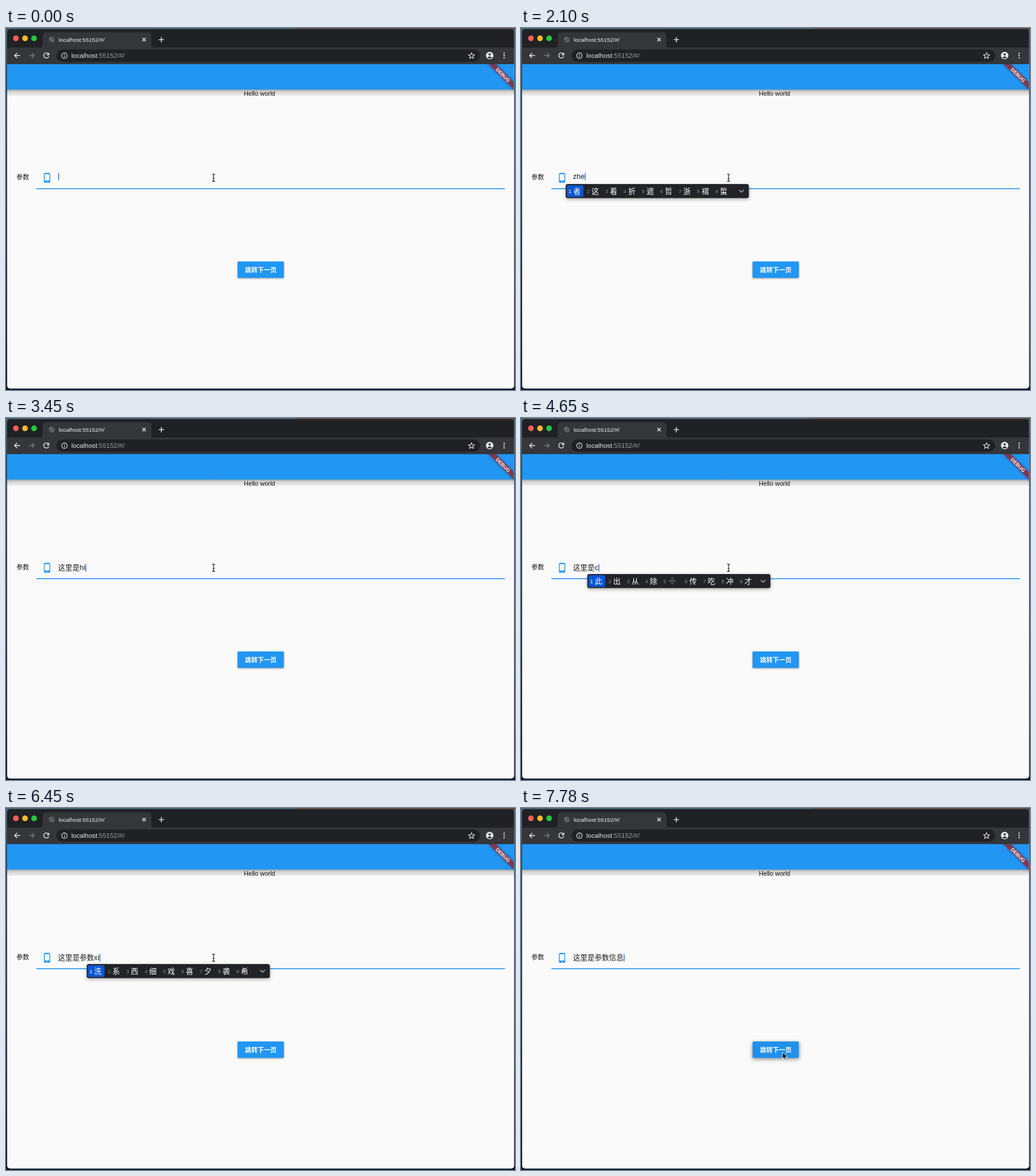
These frames come from a looping animation (888 by 631 pixels, 8000 ms). An HTML page:

```html
<!DOCTYPE html>
<html lang="zh-CN">
<head>
<meta charset="utf-8">
<title>Form demo</title>
<style>
html, body { margin: 0; width: 100%; height: 100%; overflow: hidden; background: #14263a; }
svg { display: block; width: 888px; height: 631px; }
text { font-family: "Liberation Sans", Arial, "Noto Sans CJK SC", "Noto Sans CJK", "Noto Sans CJK JP", sans-serif; white-space: pre; }
.line { fill: none; stroke: #e8eaed; stroke-width: 1.4; }
.button { filter: drop-shadow(0 1.5px 1.6px rgba(0,0,0,.42)); }
.button.hover { filter: drop-shadow(0 2.5px 3.5px rgba(0,0,0,.48)); }
.button.hover rect { fill: #2090ea; }
.panel { filter: drop-shadow(0 2px 3px rgba(0,0,0,.32)); }
</style>
</head>
<body>
<svg viewBox="0 0 888 631" xmlns="http://www.w3.org/2000/svg">
  <defs>
    <linearGradient id="desk" x2="0" y2="1">
      <stop stop-color="#3a6580"/><stop offset=".1" stop-color="#29506d"/>
      <stop offset=".5" stop-color="#233c58"/><stop offset="1" stop-color="#0d1a2b"/>
    </linearGradient>
    <linearGradient id="shade" x2="0" y2="1">
      <stop stop-color="#000" stop-opacity=".36"/><stop offset=".35" stop-color="#000" stop-opacity=".16"/>
      <stop offset="1" stop-color="#000" stop-opacity=".05"/>
    </linearGradient>
    <clipPath id="window"><rect x="2" y="1.5" width="884.5" height="627" rx="5"/></clipPath>
    <clipPath id="page"><rect x="2" y="63" width="884" height="566"/></clipPath>
  </defs>

  <rect width="888" height="631" fill="url(#desk)"/>
  <rect x="507" width="381" height="2" fill="#57473b"/>

  <g clip-path="url(#window)">
    <rect width="888" height="631" fill="#fafafa"/>
    <rect width="888" height="35" fill="#202124"/>
    <rect y="34" width="888" height="29" fill="#35363a"/>
    <path d="M58 34.5q6 0 6-6V13.500q0-6 6-6H247.500q6 0 6 6V28.500q0 6 6 6z" fill="#35363a"/>
    <circle cx="17.300" cy="18" r="4.900" fill="#ff5f57"/>
    <circle cx="33.200" cy="18" r="4.900" fill="#febc2e"/>
    <circle cx="49" cy="18" r="4.900" fill="#28c840"/>
    <circle cx="79.700" cy="20.300" r="5.300" fill="#505357"/>
    <path d="M75.500 18q2-3 4-2.500l1 2-2 2-2 1zM80 21l3-1 1 2-2 2.500-1.500-1z" fill="#6c7074"/>
    <text x="92" y="24" font-size="9.85" fill="#f1f3f4">localhost:55152/#/</text>
    <path class="line" d="M237.800 17.300l6 6m0-6l-6 6M266.300 20.400h9.400m-4.700-4.700v9.400"/>

    <path class="line" d="M24.500 48H15m4.500-4.500L15 48l4.500 4.500"/>
    <path class="line" d="M40 48h9.500m-4.500-4.500l4.500 4.500-4.500 4.500" style="stroke:#77797d"/>
    <path class="line" d="M74 45.200a4.500 4.500 0 1 0 .6 4.200"/>
    <path d="M75.300 42.800v4.700h-4.700z" fill="#e8eaed"/>
    <rect x="88" y="37.500" width="739" height="21.500" rx="10.750" fill="#202124"/>
    <circle class="line" cx="102" cy="48.200" r="4.800" style="stroke-width:1.100"/>
    <path class="line" d="M102 47.500v3.400m0-5.600v1.200" style="stroke-width:1.200"/>
    <text x="114" y="52.200" font-size="11.450" fill="#e8eaed">localhost<tspan fill="#9aa0a6">:55152/#/</tspan></text>
    <path class="line" d="M812.200 43.200l1.500 3.400 3.700.3-2.800 2.400.9 3.600-3.300-1.900-3.300 1.900.9-3.600-2.800-2.400 3.700-.3z" style="stroke-width:1.100"/>
    <circle cx="843.800" cy="48" r="6.500" fill="#e8eaed"/>
    <circle cx="843.800" cy="46" r="2" fill="#35363a"/>
    <path d="M839.800 51.300q4-3.800 8 0-4 3.800-8 0" fill="#35363a"/>
    <g fill="#e8eaed"><circle cx="869" cy="44" r="1.200"/><circle cx="869" cy="48" r="1.200"/><circle cx="869" cy="52" r="1.200"/></g>

    <rect y="107" width="888" height="11" fill="url(#shade)"/>
    <rect y="63" width="888" height="44.300" fill="#2196f3"/>
    <g clip-path="url(#page)">
      <g transform="translate(886 63) rotate(45)">
        <rect x="-40" y="22" width="80" height="9.430" fill="#b71c1c" fill-opacity=".63" style="filter:drop-shadow(0 0 2px rgba(0,0,0,.5))"/>
        <text y="29.900" font-size="8.700" font-weight="700" fill="#fff" text-anchor="middle">DEBUG</text>
      </g>
    </g>
    <text x="442.300" y="117.800" font-size="11" fill="#111" text-anchor="middle">Hello world</text>

    <text x="18.300" y="264" font-size="11" fill="#111">参数</text>
    <path transform="translate(62.200 251.700) scale(.786)" fill="#2196f3" d="M16 1H8C6.340 1 5 2.340 5 4v16c0 1.660 1.340 3 3 3h8c1.660 0 3-1.340 3-3V4c0-1.660-1.340-3-3-3zm-2 20h-4v-1h4v1zm3.250-3H6.750V4h10.500v14z"/>
    <rect x="53" y="279.400" width="817.500" height="1.600" fill="#2196f3"/>
    <text id="value" x="90.800" font-size="12.570" fill="#1c1c1c"></text>
    <rect id="caret" width="1.600" height="13" fill="#3f7ddb"/>

    <g id="button" class="button">
      <rect x="404" y="407" width="80.700" height="28.500" rx="1.600" fill="#2196f3"/>
      <text x="444.400" y="425.900" font-size="11" font-weight="700" fill="#fff" text-anchor="middle">跳转下一页</text>
    </g>
    <g id="panel" class="panel"></g>
    <g id="beam" fill="none">
      <path id="beamShape" d="M359.600 254.600q2.500 0 2.500 2v8.800q0 2-2.500 2m5 0q-2.500 0-2.500-2v-8.800q0-2 2.500-2m-4.100 7.600h3.200" stroke="#fff" stroke-width="2.400"/>
      <use href="#beamShape"/>
      <path d="M359.600 254.600q2.500 0 2.500 2v8.800q0 2-2.500 2m5 0q-2.500 0-2.500-2v-8.800q0-2 2.500-2m-4.100 7.600h3.200" stroke="#111" stroke-width="1.100"/>
    </g>
    <path id="arrow" d="M0 0V11.800L2.700 9.300 4.400 13.300 6.400 12.400 4.700 8.500H8.300Z" fill="#000" stroke="#fff" stroke-width=".9"/>
  </g>
</svg>
<script>
const LOOP = 8000;
const $ = id => document.getElementById(id);
const DONE = '这里是';
const FULL = '这里是参数';

// Each step: start time, committed text, composing text, candidates, caret shown
const typing = [
  [0, '', ''],
  [150, 'z', ''],
  [300, 'zh', ''],
  [450, 'zhe', ''],
  [750, 'zhe', '', '', false],
  [900, 'zh', ''],
  [1050, 'z', ''],
  [1200, '', ''],
  [1650, '', 'z', '在 中 这 只 再 找 走 做 最'],
  [1950, '', 'zh', '中 这 只 找 着 真 之 住 张'],
  [2100, '', 'zhe', '者 这 着 折 遮 哲 浙 褶 蜇'],
  [2550, '', 'zhe l', '这里 着落 这类 折 着 哲 浙'],
  [2700, '', 'zhe li s', '这里是 这里 着力 折 着 哲'],
  [2850, DONE, ''],
  [3000, DONE, 'hi', 'hi'],
  [3450, DONE + 'hi', ''],
  [3600, DONE + 'h', '', '', false],
  [3900, DONE + 'h', ''],
  [4200, DONE, ''],
  [4650, DONE, 'c', '此 出 从 除 ➗ 传 吃 冲 才'],
  [5100, DONE, 'ca', '擦 嚓 才 菜 参 草 层 测 猜'],
  [5250, DONE, 'can', '残 餐 参 惨 蚕 灿 惭 璨 掺'],
  [5700, DONE, 'can s', '参数 蚕食 残杀 参赛 can 残 餐'],
  [5850, DONE, 'can sh', '参数 蚕食 残杀 参赛 can 残 餐'],
  [6000, DONE, 'can sh', '参数 蚕食 残杀 参事 can 残 餐'],
  [6150, FULL, ''],
  [6300, FULL, 'x', '想 下 小 先 行 学 新 些 写'],
  [6450, FULL, 'xi', '洗 系 西 细 戏 喜 夕 袭 希'],
  [6600, FULL, 'xin xi', '信息 欣喜 心系 新 心 信 辛'],
  [6740, FULL, 'xin xi'],
  [6890, FULL + '信息', '']
];

// Arrow positions after the pointer leaves the field
const pointer = [
  [0], [7040, 430, 332], [7190, 536, 440], [7340, 605, 513], [7490, 456.3, 425.7]
];

const ruler = document.createElement('canvas').getContext('2d');
const isHan = c => c > '\u2fff';
function widthOf(text, size) {
  ruler.font = `${size}px "Liberation Sans", Arial, sans-serif`;
  return [...text].reduce((sum, c) =>
    sum + (c === '➗' ? 18 : isHan(c) ? size : ruler.measureText(c).width), 0);
}

function panelMarkup(left, words) {
  if (!words) return '';
  const list = words.split(' ');
  const single = list.length === 1;
  const width = single ? widthOf(words, 13) + 20 : 319.5;
  let x = left + 2;
  let out = `<rect x="${left}" y="272" width="${width}" height="24.5" rx="3.5" fill="#222327"/>`;
  list.forEach((word, i) => {
    const w = widthOf(word, 13);
    if (!i) out += `<rect x="${x}" y="274" width="${w + 16}" height="20.5" rx="2.5" fill="#0a57d0"/>`;
    out += `<text x="${x + 2.8}" y="287.8" font-size="9.300" fill="${i ? '#85878b' : '#fff'}">${i + 1}</text>`;
    const tx = x + 11;
    out += word === '➗'
      ? `<path d="M${tx + 1} 284h12" stroke="#55575b" stroke-width="2.6"/><g fill="#55575b"><circle cx="${tx + 7}" cy="279.800" r="2"/><circle cx="${tx + 7}" cy="288.200" r="2"/></g>`
      : `<text x="${tx}" y="288.600" font-size="13" font-weight="500" fill="#fff">${word}</text>`;
    x += w + 19;
  });
  if (!single) out += `<path d="M${left + 302.500} 282.300l4.200 4 4.200-4" fill="none" stroke="#aeb0b3" stroke-width="1.500"/>`;
  return out;
}

function showTyping([, committed, composing, words, caretOn = true]) {
  const text = committed + composing;
  const hasHan = [...text].some(isHan);
  $('value').textContent = text;
  $('value').setAttribute('y', hasHan ? 265.3 : 262.8);
  $('caret').setAttribute('x', 91 + widthOf(text, 12.57));
  $('caret').setAttribute('y', hasHan ? 254.5 : 252.5);
  $('caret').style.display = caretOn ? '' : 'none';
  $('panel').innerHTML = panelMarkup(78 + widthOf(committed, 12.57), words);
}

function showPointer([, x, y]) {
  const away = x !== undefined;
  $('beam').style.display = away ? 'none' : '';
  $('arrow').style.display = away ? '' : 'none';
  if (away) $('arrow').setAttribute('transform', `translate(${x} ${y})`);
  const hover = x > 404 && x < 485 && y > 407 && y < 436;
  $('button').classList.toggle('hover', hover);
}

function player(steps, show) {
  let current;
  return time => {
    const step = steps.findLast(s => s[0] <= time);
    if (step !== current) show(current = step);
  };
}

const tracks = [player(typing, showTyping), player(pointer, showPointer)];
const start = performance.now();
function tick() {
  const time = (performance.now() - start) % LOOP;
  tracks.forEach(play => play(time));
  requestAnimationFrame(tick);
}
tick();
</script>
</body>
</html>
```
